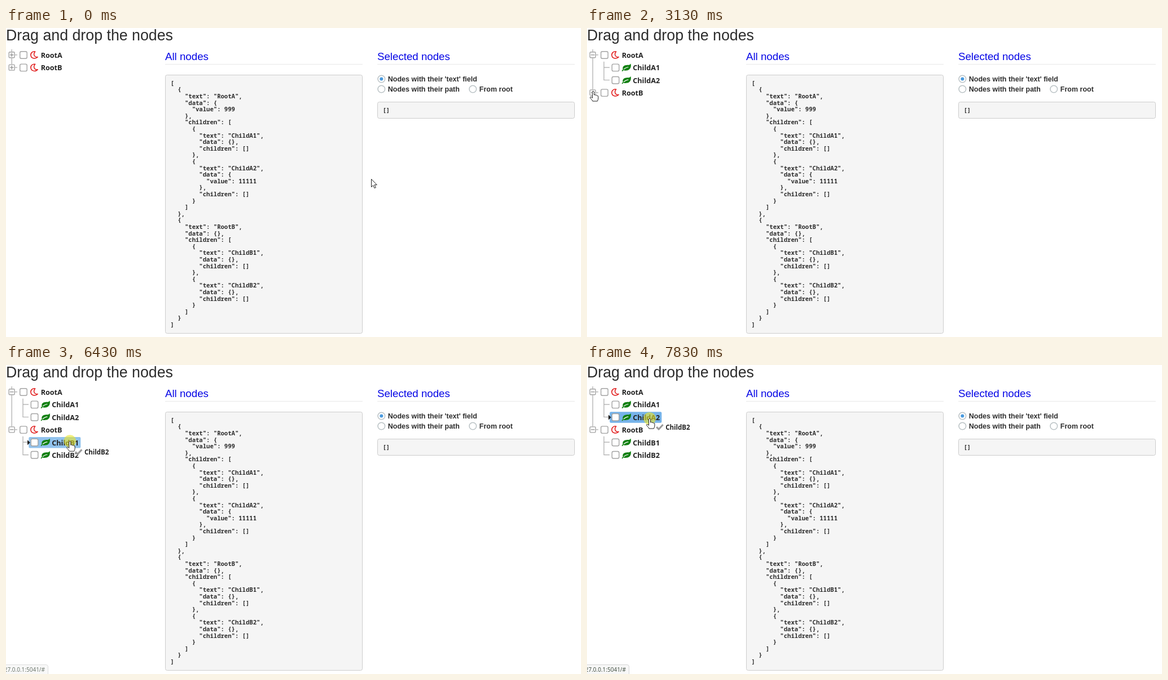
Write an HTML page that moves like this. It is 1019 by 549 pixels and loops after 8000 ms.

```html
<!DOCTYPE html>
<html lang="en">
<head>
<meta charset="utf-8">
<title>Drag and drop the nodes</title>
<style>
  html, body { margin: 0; width: 100%; height: 100%; overflow: hidden; background: #fff; }
  svg { display: block; }
  text { font-family: "Liberation Sans", Arial, sans-serif; fill: #2d2d2d; white-space: pre; }
  .title { font-size: 26.75px; }
  .head { font-size: 18.7px; fill: #0505e6; }
  .label { font-size: 12.5px; font-weight: bold; }
  .code { font: 600 10.6px "Noto Sans Mono", "DejaVu Sans Mono", monospace; }
  .node { font: bold 12.6px "Open Sans", "Noto Sans", sans-serif; fill: #222; }
  .small { font-size: 11.5px; }
  .url { font: 10px "Open Sans", "Noto Sans", sans-serif; fill: #3c4a3c; }
  .panel { fill: #f5f5f5; stroke: #ccc; }
  .line { fill: none; stroke: #aaa; stroke-width: 1.2; }
  .box { fill: #fff; stroke: #a3a3a3; stroke-width: 1.4; }
  .sign { fill: none; stroke: #888; stroke-width: 1.2; }
  .hover { fill: #76b3e9; opacity: 0; }
  .pointer { fill: #fff; stroke: #222; stroke-width: 1; stroke-linejoin: round; }
</style>
</head>
<body>
<svg id="stage" width="1019" height="549" viewBox="0 0 1019 549"></svg>
<script>
const LOOP = 8000, PITCH = 22.35, TOP = 48.3;

const text = (x, y, cls, s) => `<text x="${x}" y="${y}" class="${cls}">${s}</text>`;
const rule = x => `<path d="M${x} 64.5h350" stroke="#e8e8e8"/>`;
const panel = (y, x, h) => `<rect x="${x}" y="${y}" width="349" height="${h}" rx="3" class="panel"/>`;
const radio = (x, y, label, on) =>
  `<circle cx="${x}" cy="${y}" r="6.3" fill="#fff" stroke="#b9c1c4" stroke-width="1.5"/>` +
  (on ? `<circle cx="${x}" cy="${y}" r="3" fill="#4a9ade"/>` : '') +
  text(x + 11.5, y + 4.6, 'label', label);

// JSON panel
const leafData = (name, data = {}) => ({ text: name, data, children: [] });
const nodes = [
  { text: 'RootA', data: { value: 999 }, children: [leafData('ChildA1'), leafData('ChildA2', { value: 11111 })] },
  { text: 'RootB', data: {}, children: [leafData('ChildB1'), leafData('ChildB2')] }
];
const json = JSON.stringify(nodes, null, 2).split('\n')
  .map((s, i) => text(291.5, 101.7 + i * 11.6, 'code', s)).join('');

// Tree
const MOON = `<path d="M1.5-6C-3-7-7-3.500-6.200.8C-5.500 6 1.500 8 6 3.500C.5 4.500-3-1 1.500-6Z"
  fill="none" stroke="#e01818" stroke-width="1.5" stroke-linejoin="round"/>`;
const LEAF = `<path d="M7.700-7C6-3.500 3-5-2-4C-6-3-7.200.5-6 3.500C-4 6-1 5.300 2 4.800C7.500 3.500 9-2 7.700-7Z" fill="#118011"/>
  <path d="M-7.500 6Q-3 .2 3.500-.8" fill="none" stroke="#fff" stroke-width="1.100"/>
  <path d="M-7.700 6.300L-4.800 3" stroke="#118011" stroke-width="1.600"/>`;

const item = (name, x, y, width, icon) => `<g transform="translate(${x} ${y})">
  <rect id="${name}" y="-9.700" width="${width}" height="19.400" rx="2" class="hover"/>
  <rect x="4" y="-6.500" width="12.500" height="12.500" rx="2.500" class="box"/>
  <g transform="translate(29.500 -.3)">${icon}</g>
  ${text(41, 4.8, 'node', name)}</g>`;

const branch = key => `<g id="branch${key}">
  <rect x="5.200" y="-5.500" width="10" height="10" rx="1.500" class="box"/>
  <path d="M7 -.5h6.500" class="sign"/><path id="plus${key}" d="M10.200 -3.700v6.500" class="sign"/>
  <path d="M15.500 -.5h4.500" class="line"/>
  ${item('Root' + key, 20.7, 0, 82, MOON)}
  <svg id="kids${key}" y="${PITCH / 2}" width="200" height="0">
    <path d="M30 0V${PITCH * 1.5 - 0.5}H40M30 ${PITCH / 2 - 0.5}h10" class="line"/>
    ${[1, 2].map(i => item('Child' + key + i, 40.3, PITCH * (i - 0.5), 92, LEAF)).join('')}
  </svg></g>`;

stage.innerHTML =
  text(0, 22, 'title', 'Drag and drop the nodes') +
  text(282, 57, 'head', 'All nodes') + rule(282) + panel(83.5, 282.5, 459) + json +
  text(658, 57, 'head', 'Selected nodes') + rule(658) +
  radio(665.3, 90.5, "Nodes with their 'text' field", true) +
  radio(665.3, 108.5, 'Nodes with their path') + radio(827.3, 108.5, 'From root') +
  panel(131.5, 658.5, 29) + text(667.5, 150, 'code', '[]') +
  `<path id="trunk" class="line"/>` + branch('A') + branch('B') +
  `<path id="drop" d="M38 -4.500L42.800 0L38 4.500Z" fill="#222"/>
  <g id="status"><path d="M-1 532.500H71Q74.500 532.500 74.500 536V550H-1Z" fill="#f7f7f7" stroke="#d5d5d5"/>
    <text x="69" y="545" class="url" text-anchor="end">127.0.0.1:5041/#</text></g>
  <g id="marker"><path d="M-16 -.5l4 4l7.500 -8" fill="none" stroke="#999" stroke-width="3"/>
    ${text(0, 4.3, 'node small', 'ChildB2')}</g>
  <circle id="press" r="11" fill="#ebe428" opacity=".6"/>
  <path id="arrow" class="pointer" d="M.5 .5V14.500L3.700 11.500L6 16.500L8.300 15.500L6 10.700H10.300Z"/>
  <path id="hand" class="pointer" d="M-1.500 1.200q1.500 -2 3 0V7q2 -1.500 2.700 .5q2 -1 2.700 .8q2 -.5 2 1.500V13
    q0 2 -1.500 5H-1q-1 -2.500 -4.500 -6q0 -2.200 2 -1.500l2 1.800Z"/>`;

const el = id => document.getElementById(id);
const ramp = (a, b, t) => Math.min(1, Math.max(0, (t - a) / (b - a)));
const show = (id, on) => el(id).setAttribute('visibility', on ? 'visible' : 'hidden');
const move = (id, x, y) => el(id).setAttribute('transform', `translate(${x} ${y})`);

// Screen updates come in bursts 70 ms apart: [start, count]
const bursts = [[0, 1], [330, 3], [800, 11], [1630, 1], [1960, 1], [2160, 5], [2570, 9], [3660, 1],
  [3920, 4], [4660, 11], [5560, 2], [5960, 1], [6290, 23]];
function snap(t) {
  const [start, count] = bursts.findLast(b => b[0] <= t);
  return start + 70 * Math.min(count - 1, Math.floor((t - start) / 70));
}

// Pointer path: [time, x, y]
const path = [[0, 647, 268], [260, 647, 268], [330, 634, 232], [400, 265, 82], [470, 181, 63], [730, 181, 63],
  [940, 110, 52], [1080, 50, 46], [1150, 26, 34], [1290, 18, 40], [1500, 12, 45], [1630, 11, 44],
  [2440, 11, 44], [2920, 11, 109], [3130, 11, 112], [4590, 11, 112], [4800, 30, 124], [5100, 82, 150],
  [5360, 99, 157], [6220, 99, 157], [6500, 118, 128], [6710, 135, 100], [6850, 132.5, 93],
  [6920, 126, 92], [7060, 119, 89], [7410, 113, 90], [7830, 111, 95], [LOOP, 111, 95]];
function pointer(t) {
  const i = Math.max(1, path.findIndex(k => k[0] >= t));
  const [a, x, y] = path[i - 1], [b, u, v] = path[i];
  const p = ramp(a, b, t);
  return [x + (u - x) * p, y + (v - y) * p];
}

function render(t) {
  const open = { A: ramp(2090, 2300, t), B: ramp(3850, 4060, t) };
  const rootY = { A: TOP, B: TOP + PITCH * (1 + 2 * open.A) };
  const rows = [];
  for (const key of 'AB') {
    move('branch' + key, 0, rootY[key]);
    el('kids' + key).setAttribute('height', 2 * PITCH * open[key]);
    show('plus' + key, !open[key]);
    rows.push({ id: 'Root' + key, x: 20.7, w: 82, y: rootY[key] });
    if (open[key]) for (const i of [1, 2])
      rows.push({ id: 'Child' + key + i, x: 40.3, w: 92, y: rootY[key] + PITCH * i });
  }
  el('trunk').setAttribute('d', `M10.200 38V${TOP - 6}M10.200 ${TOP + 5}V${rootY.B - 6}`);

  // Hover colour fades over 150 ms
  const hits = (row, [x, y]) => x >= row.x && x <= row.x + row.w && Math.abs(y - row.y) < 9.7;
  for (const row of rows) {
    let sum = 0;
    for (let k = 0; k < 15; k++) sum += hits(row, pointer(t - k * 10));
    el(row.id).style.opacity = sum / 15;
  }

  const [x, y] = pointer(t);
  const over = rows.find(row => hits(row, [x, y]));
  const onToggle = x < 20.7 && Object.values(rootY).some(r => Math.abs(y - r) < 11);
  const dragging = t >= 6360;
  const hand = over || onToggle;
  show('hand', hand);
  show('arrow', !hand);
  move(hand ? 'hand' : 'arrow', x, y);

  show('press', t >= 1960 && t < 2160 || t >= 3660 && t < 3920 || t >= 5960);
  move('press', x, y);
  const [mx, my] = pointer(t - 35);
  show('marker', dragging);
  move('marker', mx + 28, my + 16);
  show('drop', dragging && over);
  if (over) move('drop', 0, y < over.y - 3.2 ? over.y - 11 : over.y);
  el('status').style.opacity = ramp(5490, 5630, t) - ramp(6400, 6540, t) + ramp(6880, 7060, t);
}

function tick() {
  render(snap(performance.now() % LOOP));
  requestAnimationFrame(tick);
}
tick();
</script>
</body>
</html>
```
